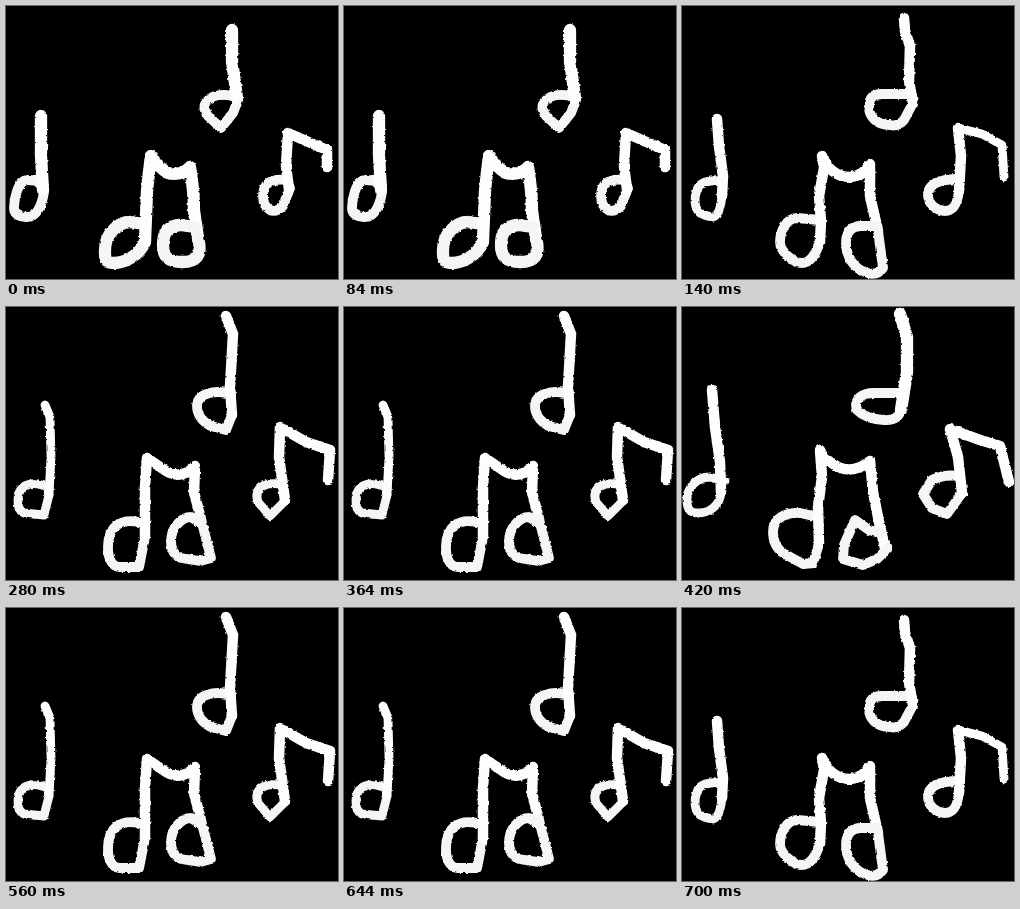
An HTML page that plays this animation: 332 by 273 pixels, repeating every 840 ms.

```html
<!DOCTYPE html>
<html lang="en">
<head>
<meta charset="utf-8">
<title>Wobbling chalk notes</title>
<style>
html, body { margin: 0; width: 100%; height: 100%; overflow: hidden; background: #000; }
svg { display: block; width: 332px; height: 273px; }
path { fill: none; stroke: #fdfdfd; stroke-width: 10.5px; stroke-linecap: round; stroke-linejoin: round; }
.head { stroke: #f5f5f5; stroke-width: 9.8px; }
.bold { stroke-width: 12.3px; }
.thin { stroke-width: 8.8px; }
.pose { opacity: 0; animation: 840ms step-end infinite; }
/* The poses play there and back: a b c d c b */
.a { animation-name: a; }
.b { animation-name: b; }
.c { animation-name: c; }
.d { animation-name: d; }
@keyframes a { 0% { opacity: 1; } 16.6666%, 100% { opacity: 0; } }
@keyframes b { 0%, 33.3333% { opacity: 0; } 16.6666%, 83.3333%, 100% { opacity: 1; } }
@keyframes c { 0%, 50%, 83.3333%, 100% { opacity: 0; } 33.3333%, 66.6666% { opacity: 1; } }
@keyframes d { 0%, 66.6666%, 100% { opacity: 0; } 50% { opacity: 1; } }
</style>
</head>
<body>
<svg viewBox="0 0 332 273">
  <filter id="chalk" filterUnits="userSpaceOnUse" x="0" y="0" width="332" height="273" color-interpolation-filters="sRGB">
    <feTurbulence type="fractalNoise" baseFrequency=".32" numOctaves="1" seed="4"/>
    <feDisplacementMap in="SourceGraphic" scale="3" xChannelSelector="R" yChannelSelector="G"/>
  </filter>

  <g class="pose a"><g filter="url(#chalk)">
    <path class="head" d="M38 186C36 200 30 211 22 211S8 209 8 202 11 174 22 174 35 178 38 186"/>
    <path class="bold" d="M35 110L35 150 37 184"/>
    <path class="head bold" d="M139 236C133 250 118 257 108 257S99 251 99 244C99 228 112 216 124 216L139 218"/>
    <path class="bold" d="M139 235L141 185Q143 165 145 150Q152 161 162 167Q176 170 184 161Q188 185 188 205L192 232"/>
    <path class="head bold" d="M192 232C197 250 190 256 176 256S157 251 157 239 162 220 174 219L189 221"/>
    <path class="head" d="M232 94L227 107 215 122 202 110Q196 102 200 96Q209 85 231 91"/>
    <path class="bold" d="M226 24L226 55 231 92"/>
    <path class="head" d="M284 182L277 200Q270 207 264 204Q257 200 257 190C257 178 264 172 281 174"/>
    <path d="M321 161L321 144Q300 135 282 127L280 160 283 183"/>
  </g></g>

  <g class="pose b"><g filter="url(#chalk)">
    <path class="head thin" d="M40 190Q38 209 31 211Q23 210 18 207C12 202 12 192 15 184Q18 173 40 175"/>
    <path d="M35 113L37 140 41 170 40 190"/>
    <path class="head" d="M138 236C133 250 128 257 120 257S98 246 98 236 104 212 115 212L138 214"/>
    <path d="M138 236L139 215 137 190 142 162 140 150C146 164 156 171 168 171Q181 170 188 158L188 190 196 225"/>
    <path class="head" d="M196 225L201 262Q195 270 186 267C172 264 164 250 164 237S171 220 179 220L194 220"/>
    <path class="head" d="M231 97L222 114Q216 121 208 119C194 119 187 110 187 101S191 88 200 88L229 88"/>
    <path d="M222 12L223 25 228 40 227 75 231 97"/>
    <path class="head" d="M277 185C275 201 270 205 263 205S246 199 246 189 255 173 278 173"/>
    <path class="thin" d="M322 171L320 139 300 128 276 122"/>
    <path d="M276 122L279 150 277 185"/>
  </g></g>

  <g class="pose c"><g filter="url(#chalk)">
    <path class="head thin" d="M43 188L38 208 18 206C12 203 12 198 12 193C12 178 25 172 43 181"/>
    <path class="thin" d="M39 98L44 110 45 150 43 188"/>
    <path class="head" d="M139 230L133 260 113 260C105 259 102 250 102 240C102 222 112 209 138 216"/>
    <path d="M139 230L139 180 141 151 160 164Q176 173 189 159L188 185 195 212"/>
    <path class="head" d="M195 212L205 251 194 254 175 251C167 248 165 241 165 234C165 220 176 210 185 210L196 217"/>
    <path class="head" d="M226 108L220 123 205 119C195 114 191 106 191 99C191 87 208 82 225 87"/>
    <path d="M220 9L227 27 224 80 226 108"/>
    <path class="head thin" d="M279 194L264 209 252 195C247 180 260 174 277 178"/>
    <path d="M322 173L324 143 300 135 274 120 273 150 279 193"/>
  </g></g>

  <g class="pose d"><g filter="url(#chalk)">
    <path class="head thin" d="M39 185C38 200 26 206 16 206S5 200 5 192 12 170 28 170L43 174"/>
    <path d="M30 83L33 120 38 155 39 185"/>
    <path class="head" d="M137 237L131 256 121 257 101 246C94 241 91 234 91 225C91 209 107 205 118 206L136 210"/>
    <path d="M137 237L136 200 140 170 138 143 142 151 156 160Q172 167 188 154L191 185 197 215 203 241"/>
    <path class="head" d="M206 241L195 252 181 258 161 252 162 238 173 213 187 223 198 226"/>
    <path class="head" d="M219 103Q216 114 202 113Q184 112 175 103C171 92 180 86 192 86L221 86"/>
    <path class="bold" d="M218 7L225 30 225 65 219 103"/>
    <path class="head" d="M280 186L265 207 250 201 241 187 250 173Q262 167 277 169"/>
    <path d="M327 175L318 139 298 133 268 122 276 150 280 186"/>
  </g></g>
</svg>
</body>
</html>
```
